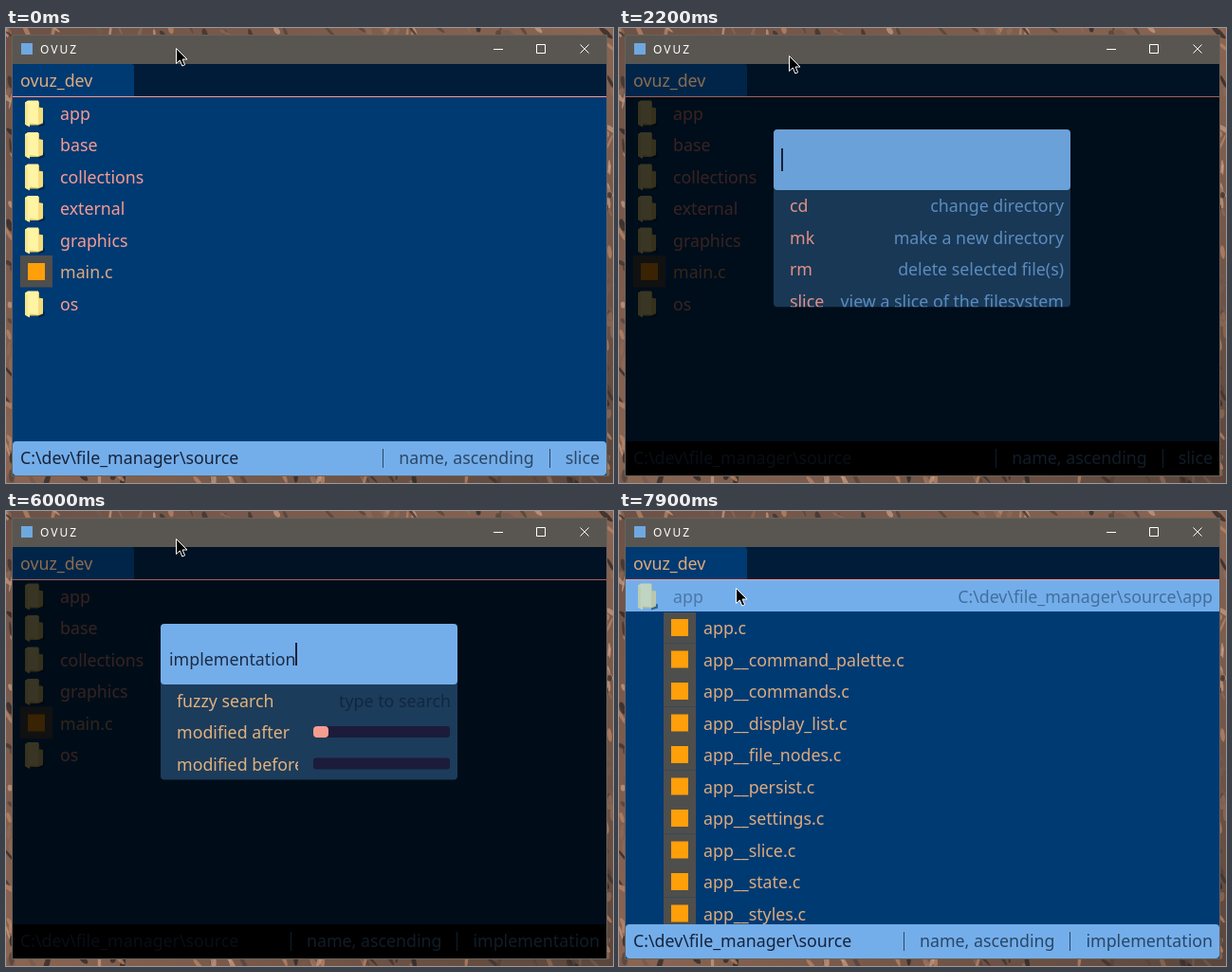
These frames come from a looping animation (640x480 px, 8 s). An HTML page:

```html
<!DOCTYPE html>
<html lang="en">
<head>
<meta charset="utf-8">
<title>File manager</title>
<style>
  html, body { margin: 0; width: 100%; height: 100%; overflow: hidden; background: #5d483d; }
  svg { display: block; width: 640px; height: 480px; }
  text { font: 17.8px "Noto Sans", "Open Sans", sans-serif; white-space: pre; }
  .end { text-anchor: end; }
  .title { font-size: 12px; letter-spacing: 2px; }
</style>
</head>
<body>
<svg id="stage" viewBox="0 0 640 480" xmlns="http://www.w3.org/2000/svg"></svg>
<script>
const LOOP = 8000, STEP = 100, ROW = 33.5, TOP = 73.5;
const BLUE = '#74aeea', PINK = '#f59c91', SAND = '#dcab7c', INK = '#16233b', SLATE = '#2a4767';

const FOLDERS = ['app', 'base', 'collections', 'external', 'graphics', 'main.c', 'os'];
const CHILDREN = ['app', 'app__command_palette', 'app__commands', 'app__display_list',
  'app__file_nodes', 'app__persist', 'app__settings', 'app__slice', 'app__state', 'app__styles'];
const COMMANDS = [['cd', 'change directory'], ['mk', 'make a new directory'],
  ['rm', 'delete selected file(s)'], ['slice', 'view a slice of the filesystem']];

const OPEN = 1750, ENTER = 2800, CLOSE = 6300, FILTER = 4400;
const COMMAND_KEYS = [2300, 2400, 2500, 2600, 2700];
const SLICE_KEYS = [4000, 4200, 4400, 4500, 4600, 4700, 4800, 5100, 5200, 5500, 5600, 5700, 5800, 5900];

// Markup helpers
const attrs = o => Object.entries(o).map(([k, v]) => ` ${k}="${v}"`).join('');
const rect = (x, y, width, height, fill, o = {}) => `<rect${attrs({ x, y, width, height, fill, ...o })}/>`;
const path = (d, fill, o = {}) => `<path${attrs({ d, fill, ...o })}/>`;
const text = (x, y, s, fill, o = {}) => `<text${attrs({ x, y, fill, ...o })}>${s}</text>`;
const group = (o, ...kids) => `<g${attrs(o)}>${kids.join('')}</g>`;
const clip = (id, x, y, w, h) => `<clipPath id="${id}">${rect(x, y, w, h, '#000', { id: id + 'Rect' })}</clipPath>`;

function random(seed) {
  return () => (seed = (seed * 16807) % 2147483647) / 2147483647;
}

function wallpaper() {
  const rnd = random(71);
  const tones = ['#2c2524', '#3d302c', '#8d6a55', '#b98567', '#745a4e', '#c79a80', '#54423a'];
  let out = rect(0, 0, 640, 480, 'url(#bark)');
  for (let i = 0; i < 150; i++) {
    const along = rnd(), depth = rnd() * 8, side = i % 4;
    const x = side < 2 ? along * 640 : side === 2 ? depth : 632 + depth;
    const y = side > 1 ? along * 480 : side === 0 ? depth : 472 + depth;
    out += `<ellipse${attrs({
      cx: x.toFixed(1), cy: y.toFixed(1), rx: (3 + rnd() * 7).toFixed(1), ry: (1 + rnd() * 2).toFixed(1),
      fill: tones[Math.floor(rnd() * tones.length)], opacity: .75,
      transform: `rotate(${Math.round(30 + rnd() * 90)} ${x.toFixed(1)} ${y.toFixed(1)})`
    })}/>`;
  }
  return out;
}

const folderIcon = id => group({ id },
  path('M34 22L41 25L41 29L34 31Z', '#002650'),
  path('M22 4H35V10L39 11V27L34 29H22Z', '#e3c95f'),
  path('M34 11H39V26L34 28Z', '#f3dc7c'),
  path('M20 5L23 3H34V28L25 27V31L20 28Z', '#fff3a4'),
  path('M20 5L23 7V30L20 28Z', '#f7e68a'));

const fileIcon = x => rect(x, -1, 34, 33.5, '#4e4e4d') + rect(x + 8, 7, 18, 18, '#ff9f0a');

const folderRow = (name, i) => group({ id: 'row' + i },
  name.endsWith('.c') ? fileIcon(15) : folderIcon('icon' + i),
  text(57, 23, name, name.endsWith('.c') ? SAND : PINK, { id: 'name' + i }));

const childRow = (name, i) => group({ transform: `translate(0 ${TOP + ROW * (i + 1)})` },
  fileIcon(47), text(89, 23, name + '.c', SAND));

const commandRow = ([name, about], i) => group({ id: 'cmd' + i },
  text(180, 23, name, PINK), text(469, 23, about, BLUE, { class: 'end', opacity: .8 }));

const sliderRow = (label, y) => text(180, y, label, '#e3b17e', { 'clip-path': 'url(#label)' }) +
  rect(324, y - 13, 144, 12, '#1c1b3a', { rx: 3 });

const stage = document.getElementById('stage');
stage.innerHTML = `<defs>
  <linearGradient id="bark" x2="1" y2="1">
    <stop offset="0" stop-color="#6d5146"/><stop offset=".5" stop-color="#8a6552"/><stop offset="1" stop-color="#5a463c"/>
  </linearGradient>` +
  clip('list', 7, 73, 626, 399) + clip('kids', 7, TOP + ROW, 626, 0) + clip('body', 7, 38, 626, 434) +
  clip('options', 163, 64, 313, 100) + clip('label', 170, 64, 138, 110) + '</defs>' +
  wallpaper() +
  rect(6.5, 7.5, 627, 465, '#003a73', { stroke: '#67625c' }) +
  group({ 'clip-path': 'url(#list)' },
    rect(7, 73, 626, 33, BLUE, { id: 'hover' }),
    FOLDERS.map(folderRow).join(''),
    text(626, 96.5, 'C:\\dev\\file_manager\\source\\app', '#416f9e', { id: 'rowPath', class: 'end' }),
    group({ 'clip-path': 'url(#kids)' }, CHILDREN.map(childRow).join(''))) +
  rect(7, 38, 626, 34, '#001c38') +
  path('M7 38H132Q135 38 135 41V72H7Z', '#003a73') +
  text(15, 62, 'ovuz_dev', SAND) +
  rect(7, 72, 626, 1, PINK) +
  rect(7, 38, 626, 35, '#000', { id: 'tabDim' }) +
  rect(7, 73, 626, 399, '#000', { id: 'listDim' }) +
  rect(7, 436, 626, 36, BLUE, { rx: 4 }) +
  rect(7, 436, 626, 36, '#000', { id: 'barDim' }) +
  group({ id: 'status' },
    text(15, 460, 'C:\\dev\\file_manager\\source', INK),
    text(0, 460, 'name, ascending', SLATE, { id: 'sort', class: 'end' }),
    text(626, 460, 'slice', SLATE, { id: 'slice', class: 'end' }),
    rect(0, 444, 1, 20, SLATE, { id: 'bar1' }),
    rect(0, 444, 1, 20, SLATE, { id: 'bar2' })) +
  group({ 'clip-path': 'url(#body)' }, group({ id: 'palette' },
    rect(163, 60, 313, 100, '#1c3c5b', { id: 'panel', rx: 4 }),
    group({ 'clip-path': 'url(#options)' },
      group({ id: 'commands' }, COMMANDS.map(commandRow).join('')),
      group({ id: 'filters' },
        text(180, 87.5, 'fuzzy search', '#e3b17e'),
        text(469, 87.5, 'type to search', '#122741', { class: 'end' }),
        sliderRow('modified after', 121), sliderRow('modified before', 154.5),
        rect(324, 108, 16, 12, PINK, { rx: 4 }))),
    rect(163, 0, 313, 64, BLUE, { rx: 4 }),
    text(172, 44, 'view a slice of the filesystem', '#436e9e', { id: 'hint' }),
    text(172, 44, '', '#1b2c47', { id: 'typed' }),
    rect(171, 20, 2, 24, INK, { id: 'caret' }))) +
  rect(7, 8, 626, 30, '#595651') +
  rect(16, 16, 12, 12, '#6fa8df') +
  text(36, 26.5, 'OVUZ', '#fff', { class: 'title' }) +
  path('M514 22.5H524M559.5 17.5H568.5V26.5H559.5ZM605.5 17.5L614.5 26.5M614.5 17.5L605.5 26.5', 'none', { stroke: '#fff' }) +
  path('M.5 .5V16.5L4.3 13L6.8 19L9.6 17.8L7.1 12H12Z', '#000', { id: 'cursor', stroke: '#fff' });

const el = {};
for (const node of stage.querySelectorAll('[id]')) el[node.id] = node;

const set = (id, o) => { for (const k in o) el[id].setAttribute(k, o[k]); };
const show = (id, on) => set(id, { visibility: on ? 'visible' : 'hidden' });
const write = (id, s) => { if (el[id].textContent !== s) el[id].textContent = s; };
const width = id => el[id].textContent ? el[id].getComputedTextLength() : 0;
const mix = (a, b, p) => a + (b - a) * p;
const span = (t, a, b) => Math.min(1, Math.max(0, (t - a) / (b - a)));
const ease = p => p * p * (3 - 2 * p);
const easeOut = p => 1 - (1 - p) ** 3;
const settle = (t, tau) => t > 0 ? 1 - Math.exp(-t / tau) : 0;
const typedBy = (word, keys, t) => word.slice(0, keys.filter(k => k <= t).length);

function drawList(t) {
  const hover = span(t, 7200, 7500);
  const grown = easeOut(span(t, 7500, 7800)) * ROW * CHILDREN.length;
  let y = TOP;
  FOLDERS.forEach((name, i) => {
    const gone = name === 'external' && t >= FILTER;
    show('row' + i, !gone);
    if (gone) return;
    set('row' + i, { transform: `translate(0 ${y})` });
    y += ROW + (i ? 0 : grown);
  });
  set('kidsRect', { height: grown });
  set('hover', { opacity: hover });
  set('rowPath', { opacity: hover });
  set('icon0', { opacity: 1 - .45 * hover });
  set('name0', { fill: hover > .4 ? '#4a79a8' : PINK });
}

function drawStatus(t, dim) {
  write('slice', typedBy('implementation', SLICE_KEYS, t) || 'slice');
  const second = 626 - width('slice') - 17;
  set('bar2', { x: Math.round(second) });
  set('sort', { x: second - 16 });
  set('bar1', { x: Math.round(second - 33 - width('sort')) });
  set('barDim', { opacity: Math.min(1, dim * 1.2) });
  set('status', { opacity: 1 - .6 * dim });
}

function drawPalette(t) {
  const open = t >= OPEN && t < CLOSE;
  show('palette', open);
  if (!open) return;
  const p = settle(t - OPEN, 178), filtering = t >= ENTER;
  const word = filtering ? typedBy('implementation', SLICE_KEYS, t) : typedBy('slice', COMMAND_KEYS, t);
  const narrowed = easeOut(span(t, COMMAND_KEYS[0] - STEP, COMMAND_KEYS[0] + 2 * STEP));
  const rows = filtering ? mix(1, 3, easeOut(span(t, ENTER - STEP, 3100))) : mix(4, 1, narrowed) * p;
  const height = rows * ROW;
  const picked = !filtering && word !== '';

  set('palette', { transform: `translate(0 ${Math.round(mix(-32, 119, p))})`, opacity: p });
  set('panel', { height: height + 4 });
  set('optionsRect', { height });
  el.commands.style.display = filtering ? 'none' : '';
  el.filters.style.display = filtering ? '' : 'none';
  COMMANDS.forEach((c, i) => {
    const match = i === COMMANDS.length - 1;
    el['cmd' + i].style.display = picked && !match ? 'none' : '';
    set('cmd' + i, { transform: `translate(0 ${64 + ROW * (picked ? 0 : i)})` });
  });
  write('typed', word);
  el.hint.style.display = filtering && !word ? '' : 'none';
  set('hint', { opacity: span(t, ENTER - STEP, 3100) });
  set('caret', { x: 171 + Math.round(width('typed')) });
}

function draw(t) {
  const dim = t < CLOSE ? settle(t - OPEN, 85) : 0;
  drawList(t);
  set('tabDim', { opacity: .37 * dim });
  set('listDim', { opacity: .78 * dim });
  drawStatus(t, dim);
  drawPalette(t);
  const down = ease(span(t, 0, 900)), away = ease(span(t, 6900, 7400));
  set('cursor', {
    transform: `translate(${Math.round(mix(179, 123, away))} ${Math.round(mix(mix(21, 29, down), 81, away))})`
  });
}

const start = performance.now();
function tick() {
  const t = (performance.now() - start) % LOOP;
  draw(Math.floor(t / STEP) * STEP);
  requestAnimationFrame(tick);
}
tick();
</script>
</body>
</html>
```
